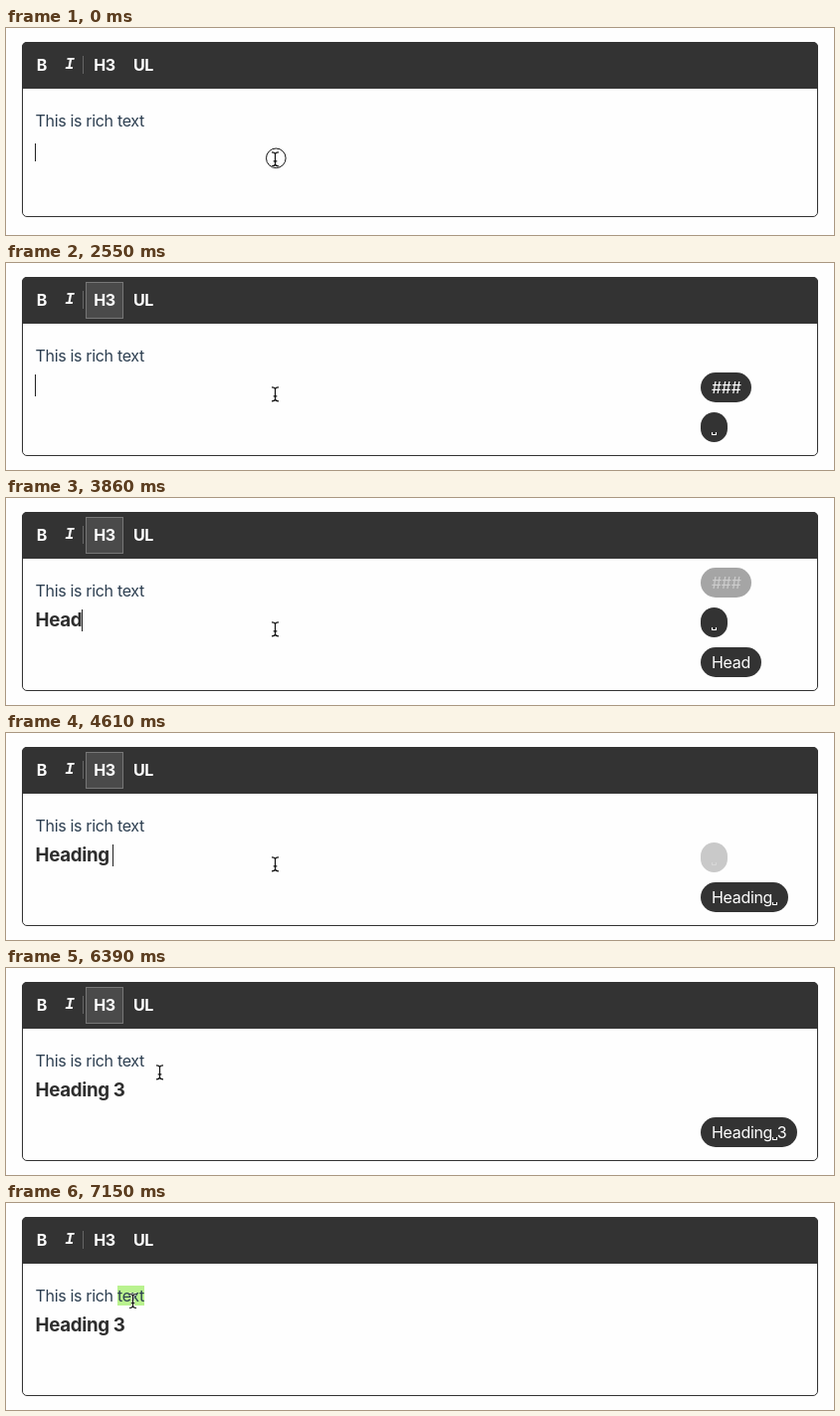
These frames come from a looping animation (832x208 px, 8 s). An HTML page:

```html
<!DOCTYPE html>
<html lang="en">
<head>
<meta charset="utf-8">
<title>Rich text editor</title>
<style>
  html, body { margin: 0; width: 832px; height: 208px; overflow: hidden; background: #fefefe; }
  body { position: relative; font: 16px/24px Inter, "Liberation Sans", sans-serif; letter-spacing: -.02em; color: #2c3e50; }
  #editor, #bar, #bar *, .line, .pill, #pointer { position: absolute; box-sizing: border-box; }
  #editor { left: 16px; top: 14px; width: 800px; height: 176px; border: 1px solid #333; border-radius: 5px; }
  #editor.tall { height: 180px; }
  #bar { left: 16px; top: 14px; width: 800px; height: 47px; border-radius: 5px 5px 0 0; background: #333; color: #fff; font-weight: 700; }
  #bar b { top: 5px; height: 37px; line-height: 35px; text-align: center; border: 1px solid transparent; }
  #bar .on { background: #4a4a4a; border-color: #777; }
  #bar .italic { font: italic 700 16px/35px "Liberation Mono", monospace; }
  #bar hr { left: 61px; top: 14px; width: 1px; height: 18px; margin: 0; border: 0; background: #666; }
  .line { left: 29.5px; white-space: pre; }
  #first { top: 81px; }
  #typed { top: 113px; }
  #typed.heading { top: 111px; font-size: 18.72px; font-weight: 700; color: #2e2e2e; }
  #caret { position: absolute; top: 3px; width: 1px; height: 18px; margin-left: -.5px; background: #222; }
  .heading #caret { top: 1px; height: 22px; }
  .selected { background: #b9f28f; }
  .pill { left: 698px; height: 30px; padding: 0 11px; border-radius: 15px; line-height: 30px; white-space: pre; }
  .pill i { display: inline-block; width: 2.6px; height: 2px; border: solid; border-width: 0 1px 1px; vertical-align: -2px; }
  #pointer { left: 0; top: 0; overflow: visible; }
</style>
</head>
<body>
  <div id="editor"></div>
  <div id="bar">
    <b style="left:9px;width:22px">B</b>
    <b class="italic" style="left:37px;width:22px">I</b>
    <hr>
    <b id="h3" style="left:64px;width:38px">H3</b>
    <b style="left:102px;width:40px">UL</b>
  </div>
  <div class="line" id="first">This is rich <span id="word">text</span></div>
  <div class="line" id="typed"><span id="text"></span><span id="caret"></span></div>
  <svg id="pointer" width="1" height="1" fill="none">
    <circle id="ring" cx=".8" cy="-1" r="9.8" stroke="#111" fill="#fefefe"/>
    <path id="halo" stroke="#fff" stroke-width="2.6" stroke-opacity=".8"/>
    <path id="beam" stroke="#111" stroke-width="1.2"/>
  </svg>
<script>
const LOOP = 8000;
const HEADING_AT = 2550, CLICK = 6970, SELECT = 7090, RELEASE = 7150;
const FADE = 250;
const KEYS = "### Heading 3";
const KEY_TIMES = [1420, 1600, 1780, 2550, 3330, 3500, 3560, 3800, 3920, 4030, 4150, 4320, 4670];
const CARET_OFF = [[260, 860], [1270, 1420], [2310, 2550], [3030, 3330], [5150, 5690], [6190, 6650], [CLICK, LOOP]];

const $ = id => document.getElementById(id);
const clamp = x => Math.min(1, Math.max(0, x));
const within = (t, [from, to]) => t >= from && t < to;

// Same curve as the CSS "ease" keyword.
function ease(x) {
  let lo = 0, hi = 1;
  const bezier = (s, a, b) => 3 * s * (1 - s) * ((1 - s) * a + s * b) + s ** 3;
  for (let i = 0; i < 20; i++) {
    const mid = (lo + hi) / 2;
    if (bezier(mid, .25, .25) < x) lo = mid; else hi = mid;
  }
  return bezier(lo, .1, 1);
}

// Each pill shows a run of keys and fades two seconds after its last key.
const pills = [[0, 3, 3780], [3, 4, 4500], [4, 13, 6600]].map(([from, to, fadeAt]) => {
  const el = document.createElement("div");
  el.className = "pill";
  document.body.insertBefore(el, $("pointer"));
  return { el, from, to, fadeAt };
});

for (const id of ["halo", "beam"]) {
  $(id).setAttribute("d", "M-3.5-7Q-.5-7 0-5.2Q.5-7 3.5-7M0-5.2V5.2M-3.5 7Q-.5 7 0 5.2Q.5 7 3.5 7M-1.8 2H1.8");
}

function drawPills(t, count) {
  const started = pills.filter(p => count > p.from).length;
  pills.forEach((p, i) => {
    const alpha = 1 - ease(clamp((t - p.fadeAt) / FADE));
    const shown = i < started && t < p.fadeAt + FADE;
    p.el.style.display = shown ? "block" : "none";
    if (!shown) return;
    p.el.innerHTML = KEYS.slice(p.from, Math.min(p.to, count)).replace(/ /g, "<i></i>");
    p.el.style.top = 150 - 40 * (started - 1 - i) + "px";
    p.el.style.background = `rgba(51,51,51,${alpha})`;
    p.el.style.color = `rgba(255,255,255,${alpha})`;
  });
}

function drawPointer(t) {
  const x = clamp((t - 5900) / 680);
  const k = x * x * (3 - 2 * x);
  $("pointer").style.transform = `translate(${270.5 - 143 * k}px, ${131.8 - 33.3 * k}px)`;
  const pressed = t < 60 || within(t, [CLICK, RELEASE]);
  $("ring").style.display = pressed ? "" : "none";
  $("ring").setAttribute("fill-opacity", t < 60 ? 1 : 0);
}

function draw(t) {
  const count = KEY_TIMES.filter(k => t >= k).length;
  const heading = t >= HEADING_AT;
  $("text").textContent = KEYS.slice(heading ? 4 : 0, count);
  $("typed").classList.toggle("heading", heading);
  $("editor").classList.toggle("tall", heading);
  $("h3").classList.toggle("on", heading && t < CLICK);
  $("word").classList.toggle("selected", t >= SELECT);
  $("caret").style.visibility = CARET_OFF.some(span => within(t, span)) ? "hidden" : "visible";
  drawPills(t, count);
  drawPointer(t);
}

const start = performance.now();
function tick() {
  draw((performance.now() - start) % LOOP);
  requestAnimationFrame(tick);
}
tick();
</script>
</body>
</html>
```
